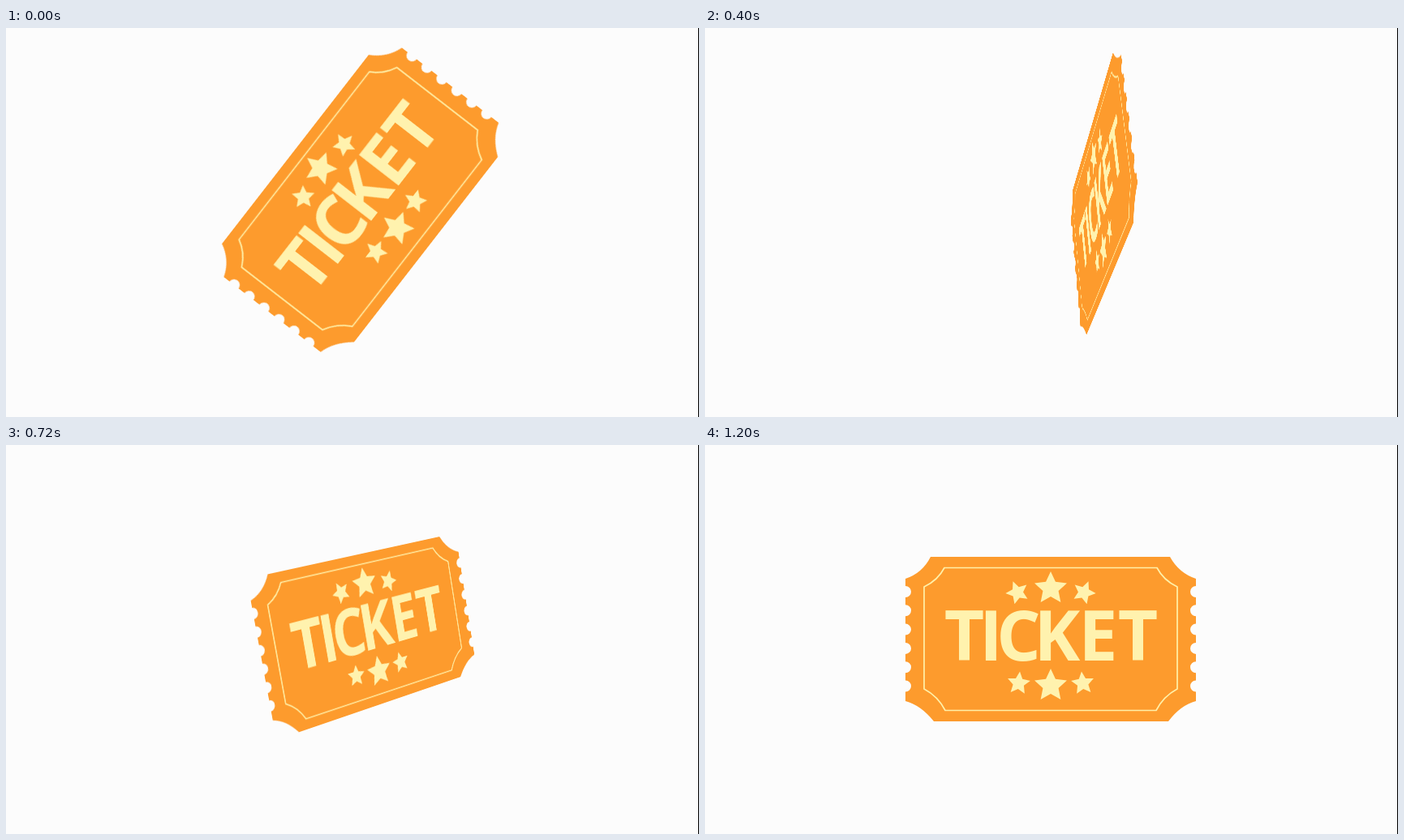
Animation, 854 px wide and 480 px high, one loop 2480 ms. Source, as an HTML page:

```html
<!DOCTYPE html>
<html lang="en">
<head>
<meta charset="utf-8">
<title>Spinning ticket</title>
<style>
  html, body { margin: 0; width: 100%; height: 100%; overflow: hidden; background: #fcfcfc; }
  #stage { position: absolute; inset: 0; overflow: clip; contain: strict; }
  #ticket {
    position: absolute; left: 246px; top: 137px; width: 360px; height: 205px;
    transform-origin: 180px 102.5px;
  }
  #edge { position: absolute; left: 853px; top: 0; width: 1px; height: 100%; background: #000; }
  #body { fill: #fd9b2d; }
  #rim { fill: none; stroke: #fff0a8; stroke-width: 1.7; }
  #stars, text { fill: #fff2ae; }
  text { font: 700 85.5px "Open Sans", "Noto Sans", sans-serif; text-anchor: middle; }
</style>
</head>
<body>
<div id="stage">
  <svg id="ticket" viewBox="246 137 360 205">
    <path id="body"/>
    <path id="rim" d="M295 151.5H557Q565 167 582 175V301Q565 310 556 327.5H296Q287 310 270 301V175Q287 167 295 151.5Z"/>
    <path id="stars"/>
    <text y="266" x="319.5 352.5 386.5 434 484.5 533.5">TICKET</text>
  </svg>
  <div id="edge"></div>
</div>
<script>
const STEPS = 15, STEP_MS = 80, LOOP_MS = 2480, DEPTH = 1270;
const REST = { x: 426, y: 239.5 };
const $ = id => document.getElementById(id);
const rad = deg => deg * Math.PI / 180;

// Ticket outline with six punched notches on each side.
function outline() {
  const notch = dir => `a7 7 0 0 0 0 ${dir * 14}v${dir * 9.3}`;
  const right = notch(1).repeat(6), left = notch(-1).repeat(6);
  return `M278 138H573Q584 158 605 165V174${right}V316Q586 321 571 341` +
         `H282Q266 321 247 316V304.5${left}V165Q268 158 278 138Z`;
}

function star(x, y, radius, turn) {
  const points = Array.from({ length: 10 }, (_, i) => {
    const angle = rad(turn + i * 36 - 90);
    const r = i % 2 ? radius * 0.48 : radius;
    return `${x + r * Math.cos(angle)} ${y + r * Math.sin(angle)}`;
  });
  return `M${points.join('L')}Z`;
}

// A large star between two small ones that lean by their own angles.
const starRow = (y, smallY, gap, lean) =>
  star(REST.x, y, 21, 0) +
  star(REST.x - gap, smallY, 14.7, lean) +
  star(REST.x + gap, smallY, 14.7, -lean);

$('body').setAttribute('d', outline());
$('stars').setAttribute('d', starRow(177, 182, 41, -22) + starRow(297, 294, 39.5, 6));

// Key points of the throw; the curve between them never overshoots.
const keys = [
  { step: 0,  x: 437, tilt: -52.2, turn: 0 },
  { step: 2,  x: 431, tilt: -44.2, turn: 168 },
  { step: 3,  x: 441, tilt: -37.8, turn: 260 },
  { step: 5,  x: 469, tilt: -29,   turn: 439 },
  { step: 8,  x: 402, tilt: -16,   turn: 645 },
  { step: 11, x: 429, tilt: -6.2,  turn: 720 },
  { step: 15, x: 426, tilt: 0,     turn: 720 }
];

function curve(name, step) {
  const slope = i => (keys[i + 1][name] - keys[i][name]) / (keys[i + 1].step - keys[i].step);
  const tangent = i => {
    if (i === 0) return slope(0);
    if (i === keys.length - 1) return 0;
    const a = slope(i - 1), b = slope(i);
    return a * b > 0 ? 2 * a * b / (a + b) : 0;
  };
  const i = keys.findIndex((_, n) => step <= keys[n + 1].step);
  const from = keys[i], to = keys[i + 1];
  const span = to.step - from.step, t = (step - from.step) / span, u = 1 - t;
  return from[name] * u * u * (1 + 2 * t) + to[name] * t * t * (3 - 2 * t) +
         span * t * u * (u * tangent(i) - t * tangent(i + 1));
}

// The ticket turns about an upright axis beside it, so it swings sideways and in depth.
function pose(step) {
  const p = step / STEPS;
  const turn = curve('turn', step), tilt = curve('tilt', step);
  const swing = 570 * p * (1 - p) ** 2;
  const near = 30 * step ** 0.77 * Math.sin(rad(turn));
  const scale = DEPTH / (DEPTH - near);
  const x = curve('x', step) + swing * Math.cos(rad(turn)) - REST.x;
  const y = -28 * (1 - p ** 1.25) * scale;
  return `translate(${x}px, ${y}px) scale(${scale}) perspective(${DEPTH / scale}px) ` +
         `rotateY(${-turn}deg) rotate(${tilt}deg)`;
}

const frames = Array.from({ length: STEPS + 1 }, (_, step) => ({
  offset: step * STEP_MS / LOOP_MS,
  transform: pose(step),
  easing: 'step-end'
}));
frames.push({ offset: 1, transform: pose(STEPS) });
$('ticket').animate(frames, { duration: LOOP_MS, iterations: Infinity });
</script>
</body>
</html>
```
